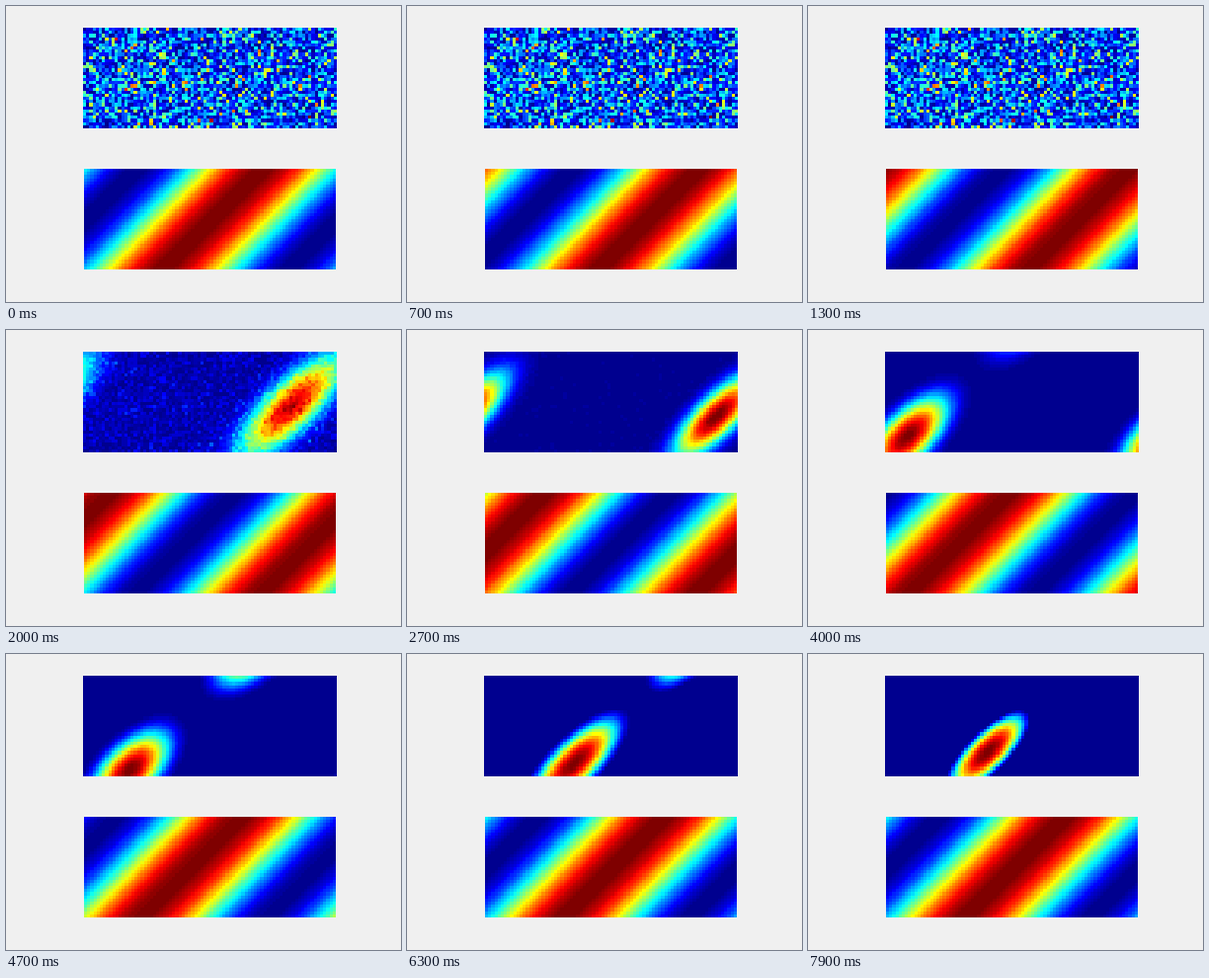
These frames come from a looping animation (400 by 300 pixels, 8 s). A matplotlib script:

```python
import numpy as np
import matplotlib.pyplot as plt
from matplotlib.animation import FuncAnimation
from matplotlib.colors import ListedColormap

W, H = 400, 300
FRAMES, INTERVAL = 80, 100
COLS, ROWS = 80, 32
PERIOD = 256.0          # wavelength of the stripes, in pixels
TURN = 51.5             # frames for one full turn of the stripes
WAKE = 15               # frame where the noise starts to settle
CELL = 3.2

# Classic 64-step rainbow map
ramp = np.arange(1, 65) / 64
jet = ListedColormap(np.clip(
    [1.5 - np.abs(4 * ramp - k) for k in (3, 2, 1)], 0, 1).T)

x, y = np.meshgrid((np.arange(COLS) + 0.5) * CELL,
                   (np.arange(ROWS) + 0.5) * CELL)
noise = np.abs(np.random.default_rng(7).normal(size=(ROWS, COLS)))
noise /= noise.max()


def crest(n):
    """Position of the stripe crest, measured along x + y."""
    return 183 + PERIOD * min(n, TURN) / TURN


def stripes(n):
    return 0.5 + 0.5 * np.cos(2 * np.pi * (x + y - crest(n)) / PERIOD)


def bump(n):
    """Slanted blob that trails the crest on a twisted torus."""
    total = crest(n) - 2 - 15 * np.exp(-0.25 * max(n - TURN, 0))
    diff = np.interp(n, [14, 27, 34, 47, 63, 72, 79],
                     [144, 169, 181, 207, 258, 278, 282])
    cx, cy = (total + diff) / 2, (total - diff) / 2
    keys = [14, 27, 34, 47, 63, 72]
    a = np.interp(n, keys, [80, 57, 55, 51, 62, 56])
    b = np.interp(n, keys, [28, 20, 23, 26, 23, 20.5])
    p = np.interp(n, keys, [8, 6, 4, 2.5, 1.5, 1])
    wrap = np.interp(n, [34, 44], [0, 1])

    out = np.zeros_like(x)
    for gain, sx, sy in ((1, 0, 0), (wrap, 128, -128)):
        for k in (-2, -1, 0, 1):
            dx = x - cx - sx - k * COLS * CELL
            dy = y - cy - sy
            q = ((dx - dy) / a) ** 2 / 2 + ((dx + dy) / b) ** 2 / 2
            out = np.maximum(out, gain * np.clip(1 - q / p, 0, 1) ** p)
    return out


def activity(n):
    if n < WAKE:
        return noise
    w = np.exp(-(n - WAKE + 1) / 3.6)
    z = w * noise + (1 - w) * bump(n)
    return (z - z.min()) / (z.max() - z.min())


fig = plt.figure(figsize=(W / 100, H / 100), dpi=100, facecolor="#f0f0f0")


def panel(left, top, right, bottom, data):
    ax = fig.add_axes([left / W, 1 - bottom / H,
                       (right - left) / W, (bottom - top) / H])
    ax.axis("off")
    return ax.imshow(data, cmap=jet, vmin=0, vmax=1, aspect="auto",
                     interpolation="nearest")


upper = panel(78, 22, 335, 124, activity(0))
lower = panel(79, 165, 334, 267, stripes(0))


def update(n):
    upper.set_data(activity(n))
    lower.set_data(stripes(n))
    return upper, lower


anim = FuncAnimation(fig, update, frames=FRAMES, interval=INTERVAL,
                     repeat=True, repeat_delay=0, blit=False)
plt.show()
```
